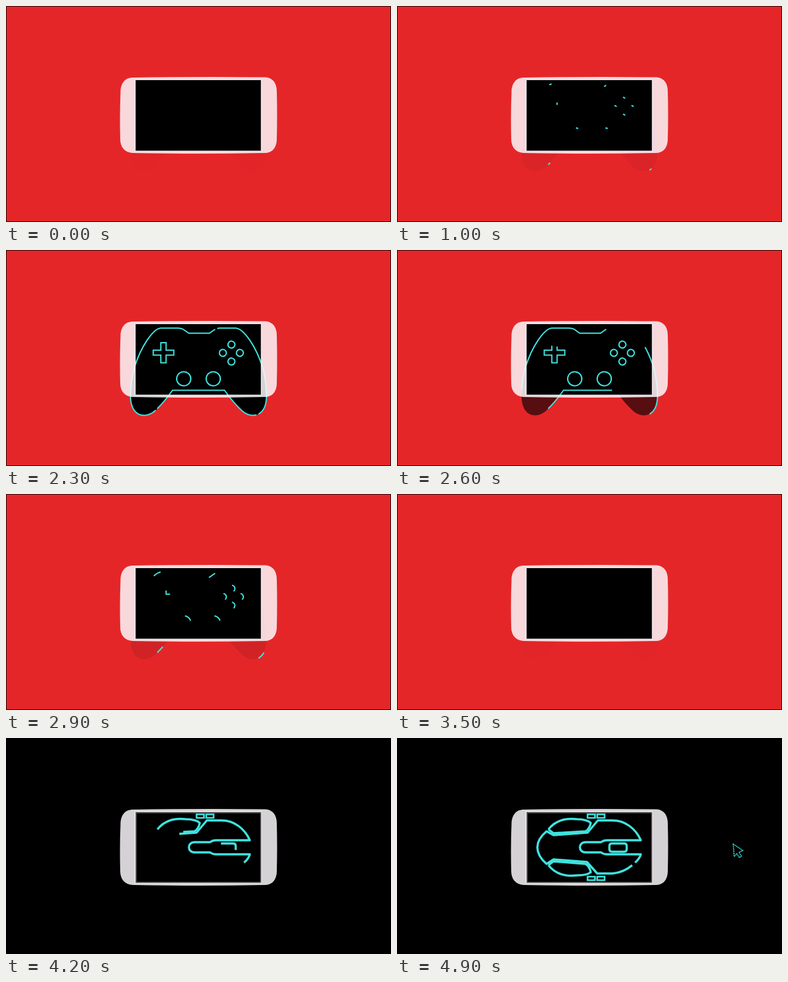
Animation of 600 by 338 pixels, one loop 5 s. Source, as an HTML page:

```html
<!DOCTYPE html>
<html lang="en">
<head>
<meta charset="utf-8">
<title>Phone as game controller and mouse</title>
<style>
  html, body { margin: 0; width: 100%; height: 100%; overflow: hidden; background: #000; }
  svg { display: block; width: 100vw; height: 100vh; }
  .line { fill: none; stroke: #3fe3df; }
  #pad .line { stroke-width: 2; }
  #mouse .line { stroke-width: 3.4; stroke-linejoin: round; }
  #mouse .plug { stroke-width: 2.6; stroke-linejoin: miter; }
  #cursor { stroke-width: 1.5; }
</style>
</head>
<body>
<svg viewBox="0 0 600 338">
  <rect width="600" height="338"/>
  <g id="red">
    <rect x=".5" y=".5" width="599" height="337" fill="#e52629" stroke="#2a0606"/>
  </g>
  <rect x="201" y="115" width="197" height="112"/>

  <g id="pad">
    <path id="padFill"/>
  </g>

  <path fill="#fcf8fc" fill-opacity=".847" fill-rule="evenodd"
    d="M198 112Q300 110.500 404 111.500C416 112 422 121 422 134Q423 170 422 208C422 222 415 230 403 230Q300 232 197 230C185 229 178 221 178 208Q177 170 178.500 134C179 121 185 112 198 112ZM202 116V226.500H397.500V116Z"/>
  <rect x="201" y="115" width="197" height="112.500" fill="none" stroke="#f2e9f1" stroke-opacity=".8" stroke-width="1.500"/>
  <rect id="bezel" x="203" y="117" width="194" height="109" fill="none" stroke="#777" stroke-width="1.200"/>

  <g id="mouse"></g>
  <path id="cursor" class="line" d="M524 166L525.500 185.500L529.500 181L533.500 187L537 185L533 179L539 176Z"/>
</svg>
<script>
const LOOP = 5000, STEP = 100, CUT = 3700, DASH = 180;
const $ = id => document.getElementById(id);

function addLine(parent, d, length) {
  const path = document.createElementNS('http://www.w3.org/2000/svg', 'path');
  path.setAttribute('class', 'line');
  path.setAttribute('d', d);
  if (length) path.setAttribute('pathLength', length);
  $(parent).append(path);
  return path;
}

// Clockwise circle that starts just right of its top
function circle(x, y, r) {
  const dx = r * Math.sin(.17), dy = r * Math.cos(.17);
  return `M${x + dx} ${y - dy}A${r} ${r} 0 1 1 ${x - dx} ${y + dy}A${r} ${r} 0 1 1 ${x + dx} ${y - dy}`;
}

// Four stretches of the controller's outline, each starting where the last one ends
const outline = [
  ['M241 122.2', 'C230 123 210 150 199.5 186C195.500 202 194 214 194 228C194 242 198 252 206.500 256.800C209 258 212 258.700 215 258.700C223 258.700 230 254.500 235.700 248.200'],
  ['M235.7 248.2', 'C246 238 252 230 259.500 219.500H340.500C348 230 354 238 364.300 248.200C370 254.500 377 258.700 385 258.700C388 258.700 391 258 393.500 256.800'],
  ['M393.5 256.8', 'C402 252 406 242 406 228C406 214 404.500 202 400.500 186C390 150 370 123 358 122.200H333Q329 122.200 326 124'],
  ['M326 124', 'L317 130.300H285L276 124Q273 122.200 268 122.200H241']
];
$('padFill').setAttribute('d', outline[0][0] + outline.map(([, d]) => d).join('') + 'Z');

const padLines = [
  ...outline.map(([from, d], i) => [from + d, i < 3 ? DASH : DASH / 2]),
  ['M249.5 151V156.8H261.5V164.6H249.5V176.500H241.300V164.600H229.500V156.800H241.300V145H249.500Z'],
  ...[[277, 201.5, 11], [323, 201.5, 11], [351.3, 148, 5.4], [338, 161, 5.4],
    [364.5, 161, 5.4], [351.3, 174.5, 5.4]].map(c => [circle(...c)])
].map(([d, length]) => addLine('pad', d, length));

// Keyframes of progress: [time, value]
const bodyKeys = [[3700, 0], [4200, .58], [4800, .88], [4900, .99]];
const during = (from, to) => [[from, 0], [to, 1]];
const plug = (x, y) => `M${x} ${y}h11.500v5.500h-11.500z`;

const mouseLines = [
  ['M371 195Q378 189 380 182H327Q322 182 318 179H294C282 179 282 163 294 163H318Q322 160 327 160H380C372 142 356 129 336 129H313L297 148L244 152L233 146C214 162 214 180 233 197L244 190L296 194L312 212H336Q356 210 371 195', bodyKeys],
  ['M236 143C246 130 262 125 280 127Q296 127 302 133Q300 142 294 146L244 149Z', during(3700, 4400)],
  ['M236 199L244 193L294 197Q300 201 302 210Q296 215 280 215C262 217 246 212 236 199Z', during(4200, 4800)],
  ['M335 165H354Q358 165 358 169V174Q358 178 354 178H335Q331 178 331 174V169Q331 165 335 165Z', during(3900, 4600)],
  [plug(297, 119.5), during(3700, 4200)],
  [plug(312, 119.5), during(3700, 4200)],
  [plug(297, 217), during(4200, 4800)],
  [plug(312, 217), during(4300, 4900)]
].map(([d, keys]) => {
  const path = addLine('mouse', d, 1);
  if (d.includes('h11')) path.classList.add('plug');
  return { path, keys };
});

const linear = u => u;
const sine = u => (1 - Math.cos(Math.PI * u)) / 2;

function valueAt(keys, t) {
  if (t <= keys[0][0]) return keys[0][1];
  for (let i = 1; i < keys.length; i++) {
    const [t0, v0] = keys[i - 1], [t1, v1, ease = linear] = keys[i];
    if (t <= t1) return v0 + (v1 - v0) * ease((t - t0) / (t1 - t0));
  }
  return keys[keys.length - 1][1];
}

const dashKeys = [[700, 0], [1800, 14], [2350, DASH, sine], [2900, 12, sine], [3500, 0]];

function setDash(path, on, off) {
  path.style.strokeDasharray = `${on} ${off}`;
  path.style.visibility = on > 0 ? 'visible' : 'hidden';
}

function render(t) {
  const isRed = t < CUT;
  for (const id of ['red', 'pad']) $(id).style.display = isRed ? '' : 'none';
  for (const id of ['mouse', 'cursor', 'bezel']) $(id).style.display = isRed ? 'none' : '';

  if (isRed) {
    const dash = valueAt(dashKeys, t);
    $('padFill').style.opacity = Math.min(1, dash / DASH + .02);
    padLines.forEach(path => setDash(path, dash, 400));
  } else {
    mouseLines.forEach(({ path, keys }) => setDash(path, valueAt(keys, t), 2));
    const dot = 2 * valueAt(during(4200, 4900), t);
    setDash($('cursor'), dot, 2.8 - dot);
  }
}

const start = performance.now();
function tick(now) {
  const t = Math.max(0, now - start) % LOOP;
  render(Math.floor(t / STEP) * STEP);
  requestAnimationFrame(tick);
}
render(0);
requestAnimationFrame(tick);
</script>
</body>
</html>
```
